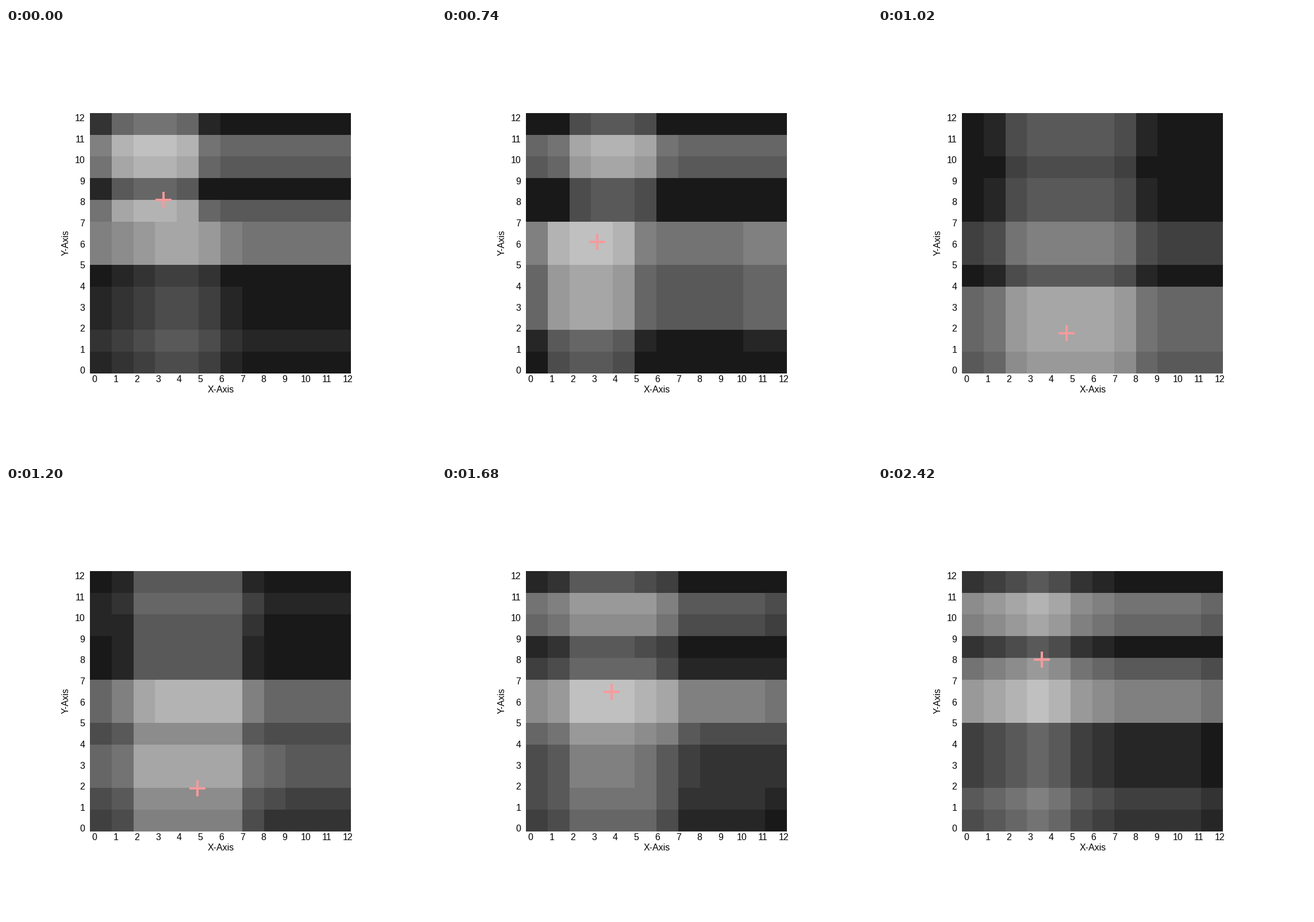
Recreate the animation shown at these times as a matplotlib script. Size 748 px wide and 748 px high, loop 2.44 s.

```python
import numpy as np
import matplotlib.pyplot as plt
from matplotlib.animation import FuncAnimation

SIZE, DPI = 748, 100
LOOP, TICK = 2440, 20
PX = 72 / DPI
CELLS = np.arange(12)
BANDS = [0, 1, 3, 4, 5, 7, 8, 10]     # first row of each horizontal band
plt.rcParams["font.family"] = "Liberation Sans"


def ridge(left, right, base, slope=0.0, height=6, soft=0.25):
    """Bright columns from left to right with soft edges on a tilted floor."""
    rise = 1 / (1 + np.exp((left - 0.5 - CELLS) / soft))
    fall = 1 / (1 + np.exp((CELLS - right + 0.5) / soft))
    return base + slope * CELLS + (height - slope * CELLS) * rise * fall


def pose(cols, dim, upper=None):
    """Columns minus the dimming of each band; upper replaces the columns above row 5."""
    rows = np.repeat(dim, np.diff(BANDS + [12])).astype(float)
    rows[[2, 11]] += 1
    level = np.round(cols) - rows[:, None]
    if upper is not None:
        level[:5] = np.round(upper) - rows[:5, None]
    return np.clip(level, 0, 14)


HEAT = {
    0: pose(ridge(3, 5, 8, -0.1, 6, 0.7), [7, 1, 8, 2, 0, 8, 7, 6],
            upper=ridge(1, 5, 8, -0.1, 6)),
    360: pose(ridge(3, 6, 8.4, -0.1, 5.6, 0.4), [8, 2, 8, 6, 0, 6, 7, 6]),
    740: pose(ridge(1, 5, 7, 0.05), [8, 1, 8, 8, 0, 2, 2, 7],
              upper=ridge(2, 6, 7, 0, 6, 0.4)),
    1020: pose(ridge(2, 8, 7, 0, 5), [7, 7, 7, 7, 4, 7, 1, 1]),
    1420: pose(ridge(2, 7, 8, -0.1, 5.5, 0.3), [8, 6, 8, 8, 0, 2, 2, 5]),
    2080: pose(ridge(2, 6, 10, -0.25, 3.5, 0.4), [8, 1, 8, 6, 0, 4, 7, 6]),
    2420: pose(ridge(2, 5, 10, -0.25, 3.5, 0.5), [8, 1, 8, 3, 0, 7, 7, 5]),
}

PATH = {0: (274, 299), 360: (327, 309.5), 740: (270.5, 372), 1020: (328, 530.5),
        1240: (335, 525), 1420: (309.5, 426.5), 1920: (290.5, 335),
        2080: (284, 308.5), 2420: (285, 302)}

# The picture updates in bursts: start, end, number of updates.
BURSTS = [(0, 140, 8), (320, 360, 3), (520, 740, 8), (760, 1020, 10),
          (1060, 1240, 9), (1420, 1420, 1), (1440, 1680, 9), (1860, 1920, 3),
          (2080, 2080, 1), (2120, 2420, 12)]
updates = np.concatenate([np.round(np.linspace(*b) / TICK) * TICK for b in BURSTS])


def step_at(ms):
    return int(np.searchsorted(updates, ms, side="right")) - 1


def blend(keys, step):
    """Linear blend of keyed values, measured in updates rather than time."""
    knots = [step_at(ms) for ms in keys]
    values = [np.asarray(v, float) for v in keys.values()]
    i = min(int(np.searchsorted(knots, step, side="right")) - 1, len(knots) - 2)
    u = (step - knots[i]) / (knots[i + 1] - knots[i])
    return values[i] * (1 - u) + values[i + 1] * u


fig = plt.figure(figsize=(SIZE / DPI, SIZE / DPI), dpi=DPI, facecolor="white")
ax = fig.add_axes([0, 0, 1, 1])
ax.axis("off")

image = ax.imshow(np.zeros((12, 12)), cmap="gray", vmin=0, vmax=255, aspect="auto",
                  interpolation="nearest", extent=(146.5, 600, 601, 148))
ax.set(xlim=(0, SIZE), ylim=(SIZE, 0))


def label(x, y, text, ha="center", **kw):
    ax.text(x, y, text, ha=ha, va="baseline", fontsize=16 * PX, color="black", **kw)


for n in range(13):
    label(154.3 + 36.7 * n, 616.5, str(n))
    label(137.5, 601.3 - 36.6 * n, str(n), ha="right")
label(373.5, 634, "X-Axis")
label(109, 374, "Y-Axis", rotation=90, rotation_mode="anchor")

ARM = 14
pink = dict(color="#f79a9c", lw=4 * PX, solid_capstyle="butt")
across, = ax.plot([], [], **pink)
upright, = ax.plot([], [], **pink)
jump, = ax.plot([], [], color="#a3dcf5", lw=4 * PX, solid_capstyle="round")


def draw(frame):
    step = step_at(frame * TICK)
    image.set_data(25.5 + 12.75 * np.round(blend(HEAT, step)))

    x, y = blend(PATH, step)
    across.set_data([x - ARM, x + ARM], [y, y])
    upright.set_data([x, x], [y - ARM, y + ARM])

    # A long move leaves a line back to where the cross was.
    px, py = blend(PATH, max(step - 1, 0))
    far = np.hypot(x - px, y - py) > 20
    jump.set_data(([x, px], [y, py]) if far else ([], []))
    return image, across, upright, jump


anim = FuncAnimation(fig, draw, frames=LOOP // TICK, interval=TICK,
                     repeat=True, repeat_delay=0, blit=False)
plt.show()
```
